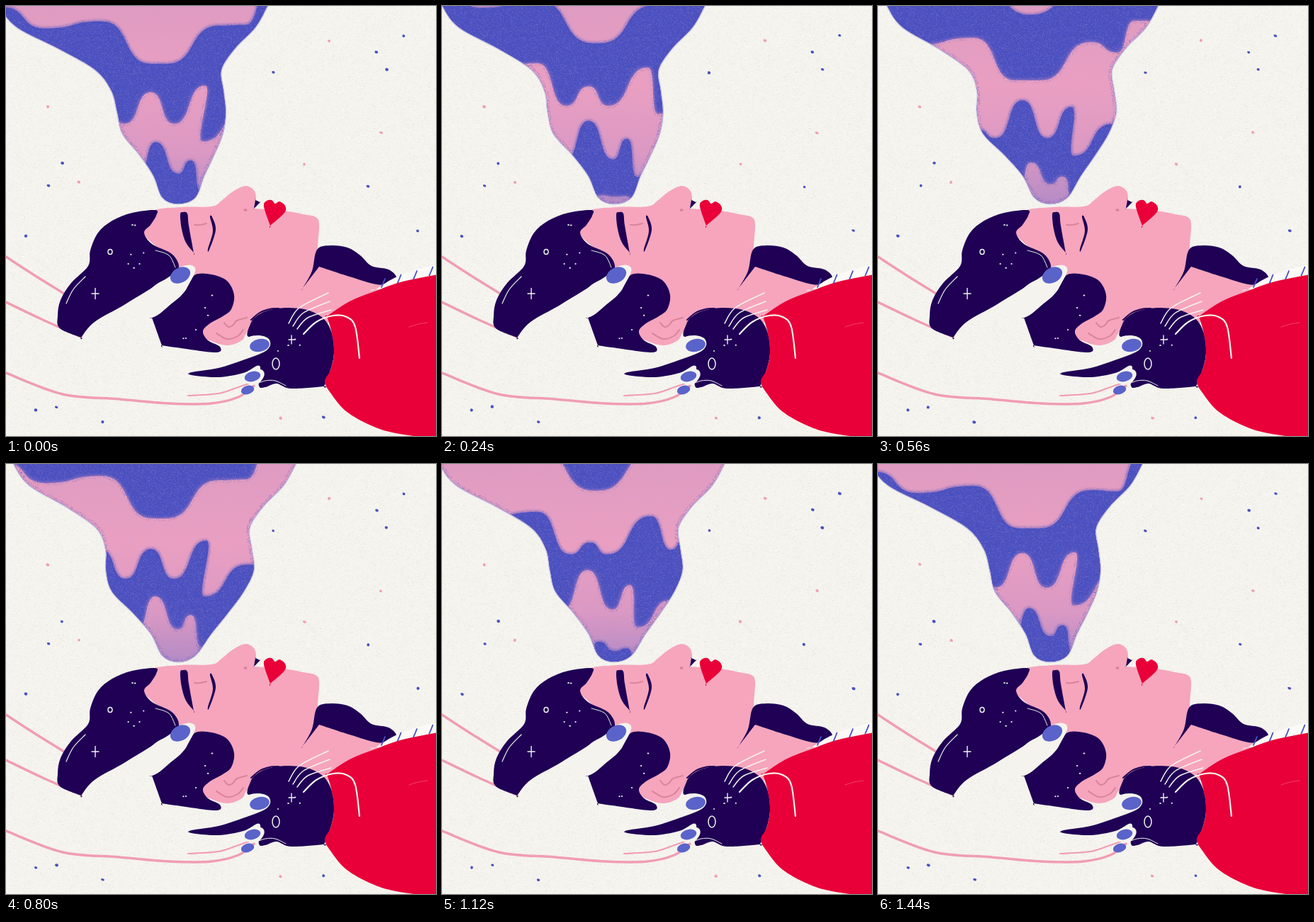
These frames come from a looping animation (607 px wide and 607 px high, 1.52 s). An HTML page with a canvas:

```html
<!DOCTYPE html>
<html lang="en">
<head>
<meta charset="utf-8">
<title>Daydream</title>
<style>
  html, body { margin: 0; width: 100%; height: 100%; overflow: hidden; background: #f4f3ee; }
  canvas { display: block; width: 100vw; height: 100vh; }
</style>
</head>
<body>
<canvas id="stage" width="607" height="607"></canvas>
<script>
const SIZE = 607, LOOP = 1520, STEP = 80;
const PAPER = '#f4f3ee', INK = '#1f0055', BLUE = '#4b50bf', PINK = '#f6a5bd',
      ROSE = '#f09db2', RED = '#e90038', NAIL = '#5a63c9', LINE = '#d98499';
const ctx = document.getElementById('stage').getContext('2d');

const ramp = v => Math.max(0, Math.min(1, v));
const ease = v => ramp(v) ** 2 * (3 - 2 * ramp(v));
const arch = v => Math.sin(Math.PI * ramp(v));

function seeded(seed) {
  return () => {
    seed = (seed + 0x6d2b79f5) | 0;
    let n = Math.imul(seed ^ (seed >>> 15), 1 | seed);
    n = (n + Math.imul(n ^ (n >>> 7), 61 | n)) ^ n;
    return ((n ^ (n >>> 14)) >>> 0) / 4294967296;
  };
}

function layer(size) {
  const canvas = document.createElement('canvas');
  canvas.width = canvas.height = size;
  return canvas.getContext('2d');
}

// Smooth curve through points; a doubled point makes a corner.
function curve(pts, closed) {
  const path = new Path2D(), n = pts.length / 2;
  const at = i => {
    i = closed ? (i + n) % n : Math.max(0, Math.min(n - 1, i));
    return [pts[2 * i], pts[2 * i + 1]];
  };
  path.moveTo(...at(0));
  for (let i = 0; i < (closed ? n : n - 1); i++) {
    const [a, b, c, d] = [at(i - 1), at(i), at(i + 1), at(i + 2)];
    path.bezierCurveTo(b[0] + (c[0] - a[0]) / 6, b[1] + (c[1] - a[1]) / 6,
      c[0] - (d[0] - b[0]) / 6, c[1] - (d[1] - b[1]) / 6, c[0], c[1]);
  }
  return path;
}

// Resting sides of the smoke every 30 px downward; both sway once per loop.
const LEFT = [2, 25, 80, 127, 145, 149, 157, 184, 207, 221];
const RIGHT = [388, 371, 342, 323, 326, 329, 320, 303, 284, 267];

function smokePath(time) {
  const swing = peak => Math.cos(2 * Math.PI * (time - peak) / LOOP);
  const hold = y => ramp((270 - y) / 120);
  const left = LEFT.flatMap((x, i) => {
    const y = i * 30;
    return [x + 12 * hold(y) * Math.cos(Math.PI * y / 190) * swing(640), y];
  });
  const right = RIGHT.map((x, i) => [x + 21 * hold(i * 30) * swing(860), i * 30]).reverse().flat();
  return curve([left[0] - 10, -30, ...left, 243, 279, ...right, right[right.length - 2] + 14, -30], true);
}

// Wavy band edge: two crests and three drips that rise, grow and melt together with age.
function bandPath(age) {
  const rise = 270 - 260 * (age / 2640) ** 1.3;
  const spread = arch(age / 2300);
  const hump = [205 - 70 * ramp(age / 1200), rise - 60 * ramp((age - 1000) / 500)];
  const drip = [276 + 62 * ease((age - 1250) / 600), rise + 25 - 80 * ease((age - 1360) / 700)];
  const points = [
    [hump[0] - 140, hump[1] - 20],
    [hump[0] - 80, hump[1] + 10],
    hump,
    [214 - 48 * spread ** 1.5, rise],
    [226 - 22 * spread, rise - 56 * arch(age / 1840)],
    [244 - 22 * (age / 2300) ** 2, rise],
    [261 + 40 * ramp((age - 800) / 1000), rise - 54 * ramp(age / 1300) ** 1.2],
    drip,
    [285 + 0.041 * age, drip[1] - 10 - 35 * ramp(age / 1100)]
  ];
  const path = new Path2D();
  path.moveTo(-160, 700);
  path.lineTo(-160, points[0][1]);
  path.lineTo(...points[0]);
  for (let i = 1; i < points.length; i++) {
    const [ax, ay] = points[i - 1], [bx, by] = points[i];
    const h = Math.max(0.6 * (bx - ax), 12);
    path.bezierCurveTo(ax + h, ay, bx - h, by, bx, by);
  }
  path.lineTo(700, points[points.length - 1][1]);
  path.lineTo(700, 700);
  return path;
}

function speckle(color, count, seed) {
  const g = layer(160), rnd = seeded(seed);
  g.fillStyle = color;
  for (let i = 0; i < count; i++) g.fillRect(rnd() * 160 | 0, rnd() * 160 | 0, 1, 1);
  return ctx.createPattern(g.canvas, 'repeat');
}
const blueGrain = speckle('rgba(75,80,191,.55)', 11000, 3);
const paleGrain = speckle('rgba(190,160,225,.14)', 8000, 8);
const smokePink = ctx.createLinearGradient(0, 0, 0, 278);
smokePink.addColorStop(0, '#e09bc0');
smokePink.addColorStop(0.4, '#eb9fc0');
smokePink.addColorStop(0.75, '#dc98c2');
smokePink.addColorStop(1, '#b48ac4');

const BIRTH = 220;

function drawSmoke(time) {
  const body = smokePath(time);
  ctx.save();
  ctx.lineWidth = 3;
  ctx.strokeStyle = 'rgba(75,80,191,.3)';
  ctx.stroke(body);
  ctx.clip(body);
  for (let k = 4; k >= -1; k--) {
    const age = time - BIRTH + k * LOOP / 2;
    if (age < 0) continue;
    const blue = k % 2 !== 0, band = bandPath(age);
    ctx.shadowColor = blue ? BLUE : '#d794c2';
    ctx.shadowBlur = 5;
    ctx.fillStyle = blue ? BLUE : smokePink;
    ctx.fill(band);
    ctx.shadowBlur = 0;
    ctx.strokeStyle = blueGrain;
    ctx.lineWidth = 7;
    ctx.globalAlpha = 0.35;
    ctx.stroke(band);
    ctx.globalAlpha = 1;
  }
  ctx.fillStyle = paleGrain;
  ctx.fillRect(0, 0, SIZE, 290);
  ctx.lineWidth = 8;
  ctx.globalAlpha = 0.5;
  ctx.stroke(body);
  ctx.restore();
}

const blueDots = [561, 42, 523, 65, 537, 90, 377, 94, 79, 222, 60, 254, 28, 325, 511, 255, 581, 317, 42, 570, 71, 566, 136, 587, 448, 581];
const pinkDots = [456, 49, 529, 179, 59, 142, 103, 249, 421, 223, 387, 582];

function drawDots(frame) {
  const rnd = seeded(frame * 31 + 5);
  for (const [dots, color] of [[blueDots, BLUE], [pinkDots, ROSE]]) {
    ctx.fillStyle = color;
    for (let i = 0; i < dots.length; i += 2) {
      ctx.beginPath();
      ctx.ellipse(dots[i] + rnd() - 0.3, dots[i + 1] + rnd() - 0.5, 1.8 + rnd() * 0.8, 1.6 + rnd() * 0.6, 0.3, 0, 7);
      ctx.fill();
    }
  }
}

function paintScene(g) {
  const rnd = seeded(12);
  const shape = (color, ...pts) => { g.fillStyle = color; g.fill(curve(pts, true)); };
  const line = (color, width, ...pts) => {
    g.strokeStyle = color;
    g.lineWidth = width;
    g.stroke(curve(pts, false));
  };
  const oval = (color, x, y, rx, ry, turn = 0) => {
    g.fillStyle = color;
    g.beginPath();
    g.ellipse(x, y, rx, ry, turn, 0, 7);
    g.fill();
  };
  const ring = (x, y, rx, ry) => {
    g.strokeStyle = PAPER;
    g.lineWidth = 1.5;
    g.beginPath();
    g.ellipse(x, y, rx, ry, 0, 0, 7);
    g.stroke();
  };
  const sparkle = (x, y, r) => {
    line(PAPER, 1.4, x - r, y, x + r, y);
    line(PAPER, 1.4, x, y - r * 1.5, x, y + r * 1.5);
  };
  const stars = (x, y, rx, ry, count) => {
    for (let i = 0; i < count; i++) {
      oval(PAPER, x + (2 * rnd() - 1) * rx, y + (2 * rnd() - 1) * ry, 1 + rnd() * 0.4, 1);
    }
  };
  g.lineCap = g.lineJoin = 'round';

  g.fillStyle = PAPER;
  g.fillRect(0, 0, SIZE, SIZE);
  for (let i = 0; i < 50000; i++) {
    g.fillStyle = i % 2 ? 'rgba(255,255,255,.35)' : 'rgba(190,182,165,.13)';
    g.fillRect(rnd() * SIZE | 0, rnd() * SIZE | 0, 1 + rnd() * 2 | 0, 1);
  }

  // Arms
  line(ROSE, 3.5, 0, 354, 40, 380, 82, 406);
  line(ROSE, 3.5, 0, 418, 50, 442, 106, 467);
  line(ROSE, 3.5, 0, 518, 80, 548, 160, 555, 230, 561, 290, 561, 328, 552, 350, 536);
  line(ROSE, 2.2, 257, 550, 300, 547, 328, 538, 352, 530);

  // Face and neck
  shape(PINK, 205, 290, 245, 284, 290, 283, 304, 275, 320, 262, 338, 254, 350, 260, 353, 272, 350, 286, 350, 286,
    392, 289, 420, 294, 437, 298, 442, 308, 440, 340, 440, 360, 485, 374, 530, 390, 530, 398, 470, 430,
    440, 460, 385, 460, 345, 458, 333, 472, 313, 479, 290, 473, 270, 460, 255, 400, 240, 365, 188, 315);

  // Hair
  shape(INK, 419, 398, 419, 398, 432, 374, 439, 344, 458, 338, 482, 341, 500, 352, 516, 367, 540, 372,
    551, 383, 541, 391, 523, 393, 485, 382, 442, 368, 442, 368);
  shape(INK, 119, 345, 130, 320, 150, 303, 178, 292, 211, 288, 212, 296, 204, 309, 195, 320,
    206, 336, 234, 350, 244, 368, 232, 381, 170, 420, 125, 446, 106, 468, 106, 468,
    76, 455, 73, 437, 77, 415, 92, 391, 116, 367);
  shape(INK, 206, 440, 206, 440, 236, 418, 253, 402, 266, 380, 290, 379, 312, 388, 322, 408, 318, 428, 306, 438,
    288, 448, 278, 459, 285, 472, 302, 481, 296, 489, 240, 482, 220, 479, 220, 479);
  shape(PAPER, 240, 373, 250, 367, 262, 366, 267, 375, 251, 404, 235, 419, 206, 440, 180, 430, 207, 397, 232, 382);
  shape(INK, 341, 466, 345, 449, 352, 439, 369, 430, 395, 426, 425, 429, 448, 441, 460, 462, 463, 490, 458, 514,
    449, 537, 449, 537, 402, 540, 382, 533, 366, 538, 357, 536, 358, 508, 335, 518, 300, 524,
    262, 521, 262, 517, 300, 511, 340, 498, 368, 486, 371, 474, 358, 466);
  shape(PAPER, 340, 469, 356, 465, 370, 469, 373, 479, 365, 487, 348, 492, 334, 486);
  shape(PAPER, 334, 524, 348, 513, 362, 514, 364, 523, 354, 534, 338, 532);
  line(INK, 2, 346, 443, 358, 433, 372, 428, 385, 427);
  line(PAPER, 1, 211, 345, 230, 352, 239, 369);
  line(PAPER, 1, 352, 534, 366, 529, 380, 529, 395, 536);
  line(PAPER, 1.2, 85, 420, 95, 400, 112, 382);

  // Collar and shirt
  shape('#fbfaf6', 522, 400, 522, 400, 548, 384, 580, 372, 620, 362, 620, 362, 620, 392, 620, 392);
  shape(RED, 615, 378, 615, 378, 560, 389, 520, 403, 485, 417, 453, 438, 453, 438, 460, 462, 463, 490, 458, 514,
    450, 530, 458, 546, 480, 572, 515, 592, 550, 603, 615, 612, 615, 612);
  for (let i = 0; i < 4; i++) {
    const x = 530 + i * 22.5, y = 397 - i * 5.5;
    line(BLUE, 1.8, x, y, x + 3, y - 7, x + 5, y - 12);
  }
  line('#f25470', 0.8, 569, 453, 582, 449, 595, 447);

  // Loose strands
  for (let i = 0; i < 3; i++) {
    const x = 399 + i * 6, y = 448 + i * 4;
    line(PAPER, 1.5, x, y, x + 15, y - 22 + i * 3, 455 + i * 2, 405 + i * 12);
  }
  line(PAPER, 2.2, 420, 463, 438, 446, 462, 437, 481, 439, 493, 453, 499, 497);

  // Nails
  oval(NAIL, 246, 380, 15, 10.5, -0.5);
  oval(NAIL, 358, 479, 14, 9, -0.2);
  oval(NAIL, 348, 523, 11.5, 7, -0.25);
  oval(NAIL, 341, 542, 9.5, 6, -0.3);

  // Features
  shape(INK, 246, 294, 250, 291, 256, 293, 258, 310, 265, 348, 265, 348, 254, 334, 248, 315);
  shape(INK, 288, 298, 291, 298, 296, 316, 287, 344, 285, 343, 292, 318);
  line(LINE, 2, 266, 309, 274, 309, 283, 307);
  oval(LINE, 338, 288, 2.5, 2);
  shape(INK, 350, 286, 350, 286, 352, 274, 352, 274, 359, 277, 359, 277);
  shape(RED, 373, 310, 373, 310, 364, 283, 368, 275, 375, 274, 380, 279, 386, 276, 394, 282, 393, 292);
  line(LINE, 2, 308, 447, 314, 453, 321, 450, 326, 444, 340, 440);
  line(LINE, 2, 297, 462, 312, 470, 327, 466, 335, 457);

  // Stars in the hair
  ring(147, 347, 3, 3.5);
  ring(381, 505, 5, 8);
  sparkle(126, 406, 5);
  sparkle(403, 471, 4);
  stars(177, 307, 12, 8, 2);
  stars(186, 358, 14, 12, 5);
  stars(280, 420, 14, 18, 3);
  stars(258, 462, 14, 9, 3);
  stars(404, 482, 20, 12, 4);
}

const scene = layer(SIZE);
paintScene(scene);

const start = performance.now();
function draw() {
  const frame = Math.floor(((performance.now() - start) % LOOP) / STEP);
  ctx.drawImage(scene.canvas, 0, 0);
  drawDots(frame);
  drawSmoke(frame * STEP);
  requestAnimationFrame(draw);
}
draw();
</script>
</body>
</html>
```
